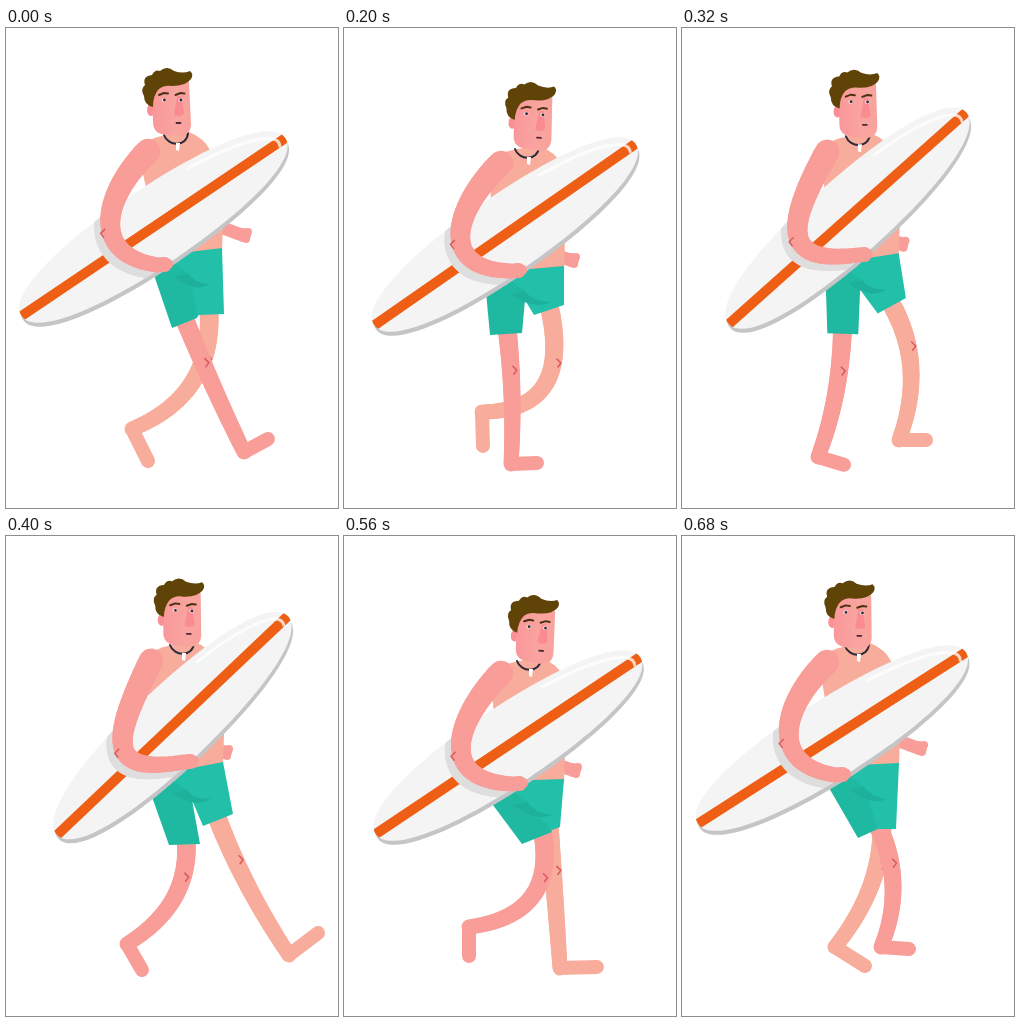
These frames come from a looping animation (332x480 px, 0.72 s). An HTML page with a canvas:

```html
<!DOCTYPE html>
<html lang="en">
<head>
<meta charset="utf-8">
<title>Surfer walk</title>
<style>
html, body { margin: 0; width: 100%; height: 100%; overflow: hidden; background: #fff; }
canvas { display: block; width: 332px; height: 480px; }
</style>
</head>
<body>
<canvas id="stage" width="332" height="480"></canvas>
<script>
const ctx = document.getElementById('stage').getContext('2d');
const LOOP = 720, STEP = 40;
const NEAR = '#f99d99', FAR = '#f8ad9c', MARK = '#d9595c';

// time, head x y turn, chest x y, board x y angle, far hand x y
const BODY = [
  [0, 0, 0, 0, 0, 0, 147.5, 199, 34, 237, 207],
  [80, 15, 10, 4, 9, 10, 154, 205.5, 30.9, 234, 222],
  [200, 24, 14, 4, 13, 14, 161, 206.5, 34.8, 227, 232],
  [280, 12.5, 3.5, 1, 7, 3, 164.5, 193, 40, 220, 218],
  [400, 11, 2.5, 2, 6, 2, 166.5, 189.5, 43.5, 218, 216],
  [480, 19, 14, 4, 11, 13, 166, 202, 39, 224, 227],
  [560, 26.5, 19, 5, 15, 18, 164, 209.5, 33.8, 229, 234],
  [680, 5.5, 4.5, 2, 5, 3, 150, 202, 32.6, 237, 212]
];
// time, shoulder, two curve handles, wrist
const ARM = [
  [0, 142, 123, 95, 170, 85, 228, 152, 237],
  [80, 150, 133, 106, 175, 90, 236, 158, 242],
  [200, 157, 135, 110, 180, 92, 242, 168, 243],
  [280, 147, 125, 108, 185, 92, 238, 174, 230],
  [400, 145, 125, 108, 200, 96, 240, 178, 226],
  [480, 151, 133, 109, 193, 94, 244, 174, 240],
  [560, 157, 137, 110, 185, 93, 245, 169, 248],
  [680, 145, 126, 97, 172, 88, 230, 154, 239]
];
// time, hip, near hem, crotch, far hem, waist
const SHORTS = [
  [0, 148, 247, 166, 300, 191, 290, 192, 288, 193, 287, 218, 286, 216, 220],
  [80, 144, 256, 163, 308, 192, 299, 190, 291, 190, 291, 218, 287, 218, 234],
  [200, 142, 264, 146, 307, 178, 305, 181, 272, 190, 287, 220, 277, 220, 238],
  [280, 143, 255, 139, 304, 170, 305, 176, 263, 195, 284, 222, 268, 217, 227],
  [400, 145, 258, 163, 309, 194, 308, 186, 264, 197, 290, 227, 278, 217, 226],
  [480, 145, 263, 170, 309, 201, 303, 197, 280, 203, 292, 222, 285, 218, 237],
  [560, 146, 265, 178, 308, 208, 296, 207, 294, 208, 294, 216, 291, 220, 243],
  [680, 146, 250, 176, 302, 198, 292, 196, 293, 195, 293, 214, 293, 217, 227]
];
// time, hem, middle of leg, ankle, toe
const NEAR_LEG = [
  [0, 179, 292, 208, 360, 238, 424, 262, 411],
  [80, 178, 300, 197, 365, 209, 432, 235, 428],
  [200, 163, 300, 168, 368, 167, 436, 193, 435],
  [280, 154, 300, 150, 370, 145, 437, 174, 437],
  [400, 180, 303, 168, 362, 121, 408, 136, 434],
  [480, 193, 301, 182, 362, 115, 393, 108, 424],
  [560, 199, 298, 187, 362, 125, 391, 125, 420],
  [640, 197, 293, 206, 345, 172, 403, 198, 424],
  [680, 196, 290, 211, 350, 199, 411, 227, 413]
];
const FAR_LEG = [
  [0, 203, 284, 186, 355, 126, 401, 142, 433],
  [80, 206, 286, 187, 362, 121, 391, 112, 423],
  [200, 206, 282, 200, 358, 138, 384, 139, 418],
  [280, 210, 276, 221, 340, 183, 402, 209, 426],
  [320, 211, 279, 229, 343, 217, 412, 244, 412],
  [400, 211, 281, 242, 350, 283, 419, 312, 397],
  [480, 207, 286, 226, 362, 248, 432, 282, 428],
  [560, 205, 288, 211, 362, 216, 432, 253, 431],
  [640, 202, 290, 200, 358, 178, 425, 208, 434],
  [680, 200, 290, 188, 352, 153, 411, 183, 430]
];

// Smooth periodic curve through the rows of a table
function pose(rows, t) {
  const n = rows.length;
  const row = i => rows[(i + n) % n];
  const when = i => row(i)[0] + Math.floor(i / n) * LOOP;
  let i = n - 1;
  while (rows[i][0] > t) i--;
  const [ta, tb, tc, td] = [when(i - 1), when(i), when(i + 1), when(i + 2)];
  const span = tc - tb, s = (t - tb) / span, s2 = s * s, s3 = s2 * s;
  return row(i).slice(1).map((b, k) => {
    const a = row(i - 1)[k + 1], c = row(i + 1)[k + 1], d = row(i + 2)[k + 1];
    const mb = (c - a) / (tc - ta) * span, mc = (d - b) / (td - tb) * span;
    return (2 * s3 - 3 * s2 + 1) * b + (s3 - 2 * s2 + s) * mb
      + (3 * s2 - 2 * s3) * c + (s3 - s2) * mc;
  });
}

function bezier(p, s) {
  const r = 1 - s, w = [r * r * r, 3 * r * r * s, 3 * r * s * s, s * s * s];
  const sum = o => w.reduce((v, k, i) => v + k * p[2 * i + o], 0);
  return [sum(0), sum(1)];
}

function shape(color, draw) {
  ctx.fillStyle = color;
  ctx.beginPath();
  draw();
  ctx.fill();
}

function poly(color, ...p) {
  shape(color, () => {
    for (let i = 0; i < p.length; i += 2) ctx.lineTo(p[i], p[i + 1]);
  });
}

function disc(color, x, y, rx, ry = rx, turn = 0) {
  shape(color, () => ctx.ellipse(x, y, rx, ry, turn, 0, 7));
}

function line(color, width, ...p) {
  ctx.strokeStyle = color;
  ctx.lineWidth = width;
  ctx.beginPath();
  for (let i = 0; i < p.length; i += 2) ctx.lineTo(p[i], p[i + 1]);
  ctx.stroke();
}

function limb(p, w0, w1, color) {
  const n = 32;
  let last = bezier(p, 0);
  for (let i = 1; i <= n; i++) {
    const next = bezier(p, i / n);
    line(color, w0 + (w1 - w0) * i / n, ...last, ...next);
    last = next;
  }
}

function leg([hx, hy, mx, my, ax, ay, tx, ty], color, shift) {
  const cx = 2 * mx - (hx + ax) / 2, cy = 2 * my - (hy + ay) / 2;
  const p = [hx, hy, (hx + 2 * cx) / 3, (hy + 2 * cy) / 3,
    (ax + 2 * cx) / 3, (ay + 2 * cy) / 3, ax, ay];
  limb(p, 19, 15, color);
  line(color, 14, ax, ay, tx, ty);
  const [x, y] = bezier(p, 0.31);
  line(MARK, 1.5, x + shift - 2, y - 4, x + shift + 2, y, x + shift - 1, y + 4);
}

function torso(dx, dy, hip, waist) {
  shape(FAR, () => {
    ctx.moveTo(132 + dx, 124 + dy);
    ctx.quadraticCurveTo(138 + dx, 111 + dy, 160 + dx, 107 + dy);
    ctx.lineTo(183 + dx, 104 + dy);
    ctx.quadraticCurveTo(198 + dx, 110 + dy, 204 + dx, 122 + dy);
    ctx.lineTo(waist[0] + 1, waist[1] - 28);
    ctx.lineTo(waist[0], waist[1] + 4);
    ctx.lineTo(hip[0] + 10, hip[1] - 8);
  });
  ctx.strokeStyle = '#2b2a3a';
  ctx.lineWidth = 2;
  ctx.beginPath();
  ctx.moveTo(158 + dx, 107 + dy);
  ctx.bezierCurveTo(162 + dx, 119 + dy, 181 + dx, 119 + dy, 182 + dx, 105 + dy);
  ctx.stroke();
  poly('#fff', 170 + dx, 115 + dy, 174 + dx, 115 + dy, 173 + dx, 123 + dy, 170 + dx, 122 + dy);
}

function outline() {
  const a = 159, b = 38.5, k = a * 0.56, j = b * 0.64;
  ctx.moveTo(-a, 0);
  ctx.bezierCurveTo(-a, -j, -k, -b, 0, -b);
  ctx.bezierCurveTo(k, -b, a, -j, a, 0);
  ctx.bezierCurveTo(a, j, k, b, 0, b);
  ctx.bezierCurveTo(-k, b, -a, j, -a, 0);
}

function board(x, y, angle, arm) {
  const turn = -angle * Math.PI / 180;
  ctx.save();
  ctx.translate(x + 1.5, y + 4);
  ctx.rotate(turn);
  shape('#c5c5c7', outline);
  ctx.restore();

  ctx.save();
  ctx.translate(x, y);
  ctx.rotate(turn);
  shape('#f4f4f4', outline);
  ctx.clip();
  ctx.fillStyle = '#ee5e15';
  ctx.fillRect(-160, -5, 320, 10);
  ctx.strokeStyle = 'rgba(255,255,255,.75)';
  ctx.lineWidth = 3;
  ctx.beginPath();
  ctx.ellipse(0, 0, 151, 32, 0, -1.15, 0.12);
  ctx.stroke();
  ctx.rotate(-turn);
  ctx.translate(-x - 6, -y + 6);
  limb(arm, 24, 16, '#dedede');
  ctx.restore();
}

function nearArm(arm) {
  limb(arm, 25, 15, NEAR);
  const [x, y] = arm.slice(6);
  shape(NEAR, () => ctx.roundRect(x - 2, y - 8, 15, 15, 6));
  disc(NEAR, x + 11, y - 1, 4, 5);
  const [ex, ey] = bezier(arm, 0.59);
  line(MARK, 1.5, ex - 7, ey - 4, ex - 11, ey, ex - 8, ey + 4);
}

function farHand(x, y) {
  line(NEAR, 13, x - 36, y - 13, x - 4, y - 1);
  disc(NEAR, x, y, 8, 7, 0.3);
  disc(NEAR, x + 5, y - 3, 4);
  disc(NEAR, x + 3, y + 4, 4);
}

function head(dx, dy, turn) {
  ctx.save();
  ctx.translate(162 + dx, 74 + dy);
  ctx.rotate(turn * Math.PI / 180);
  ctx.translate(-162, -74);
  const skin = ctx.createLinearGradient(146, 0, 186, 0);
  skin.addColorStop(0, '#fa979b');
  skin.addColorStop(0.6, '#f9a49f');
  skin.addColorStop(1, '#f9a29d');
  disc('#fa9096', 145, 82, 4, 6);
  shape(skin, () => {
    ctx.moveTo(146, 60);
    ctx.lineTo(183, 54);
    ctx.lineTo(185, 96);
    ctx.quadraticCurveTo(185, 107, 174, 108);
    ctx.lineTo(160, 107);
    ctx.quadraticCurveTo(147, 106, 147, 94);
  });
  shape('#fb8b92', () => {
    ctx.moveTo(171, 68);
    ctx.lineTo(175, 68);
    ctx.lineTo(178, 85);
    ctx.quadraticCurveTo(177, 90, 168, 87);
  });
  for (const ex of [158, 174.5]) {
    line('#4a3410', 2, ex - 5, 67, ex, 65, ex + 4, 65.5);
    disc('#f7d5cf', ex, 72, 2.4, 2);
    disc('#2c2c3c', ex + 0.4, 72, 1.4);
  }
  line('#4b2a33', 1.8, 170.5, 95, 174.5, 95);
  shape('#604307', () => {
    ctx.moveTo(147, 79);
    ctx.quadraticCurveTo(138, 77, 138, 68);
    ctx.quadraticCurveTo(134, 61, 139, 57);
    ctx.quadraticCurveTo(136, 48, 146, 47);
    ctx.quadraticCurveTo(149, 41, 154, 43);
    ctx.quadraticCurveTo(161, 37, 168, 43);
    ctx.quadraticCurveTo(177, 46, 184, 43);
    ctx.quadraticCurveTo(188, 46, 185, 51);
    ctx.quadraticCurveTo(180, 58, 166, 58);
    ctx.quadraticCurveTo(157, 57, 152, 62);
    ctx.quadraticCurveTo(147, 68, 147, 79);
  });
  ctx.restore();
}

function draw(t) {
  const [hx, hy, turn, cx, cy, bx, by, angle, fx, fy] = pose(BODY, t);
  const arm = pose(ARM, t), s = pose(SHORTS, t);
  const hip = s.slice(0, 2), nearHem = s.slice(2, 6), crotch = s.slice(6, 8);
  const farHem = s.slice(8, 12), waist = s.slice(12);
  const top = [hip[0] + 10, hip[1] - 20];
  const mid = [(hip[0] + waist[0]) / 2, (hip[1] + waist[1]) / 2 + 12];

  ctx.fillStyle = '#fff';
  ctx.fillRect(0, 0, 332, 480);
  ctx.lineCap = ctx.lineJoin = 'round';

  farHand(fx, fy);
  leg(pose(FAR_LEG, t), FAR, 6);
  leg(pose(NEAR_LEG, t), NEAR, 4);
  torso(cx, cy, hip, waist);
  poly('#22c0a9', ...top, ...waist, ...farHem.slice(2), ...farHem.slice(0, 2), ...crotch, ...hip);
  poly('#1fb8a1', ...top, ...mid, ...crotch, ...nearHem.slice(2), ...nearHem.slice(0, 2), ...hip);
  shape('#1db19b', () => {
    ctx.moveTo(...mid);
    ctx.quadraticCurveTo(mid[0] + 8, mid[1] + 11, waist[0] - 12, waist[1] + 36);
    ctx.quadraticCurveTo(mid[0] + 8, mid[1] + 20, mid[0] - 14, mid[1] + 3);
  });
  board(bx, by, angle, arm);
  nearArm(arm);
  head(hx, hy, turn);
}

function tick() {
  draw(Math.floor(performance.now() % LOOP / STEP) * STEP);
  requestAnimationFrame(tick);
}
tick();
</script>
</body>
</html>
```
